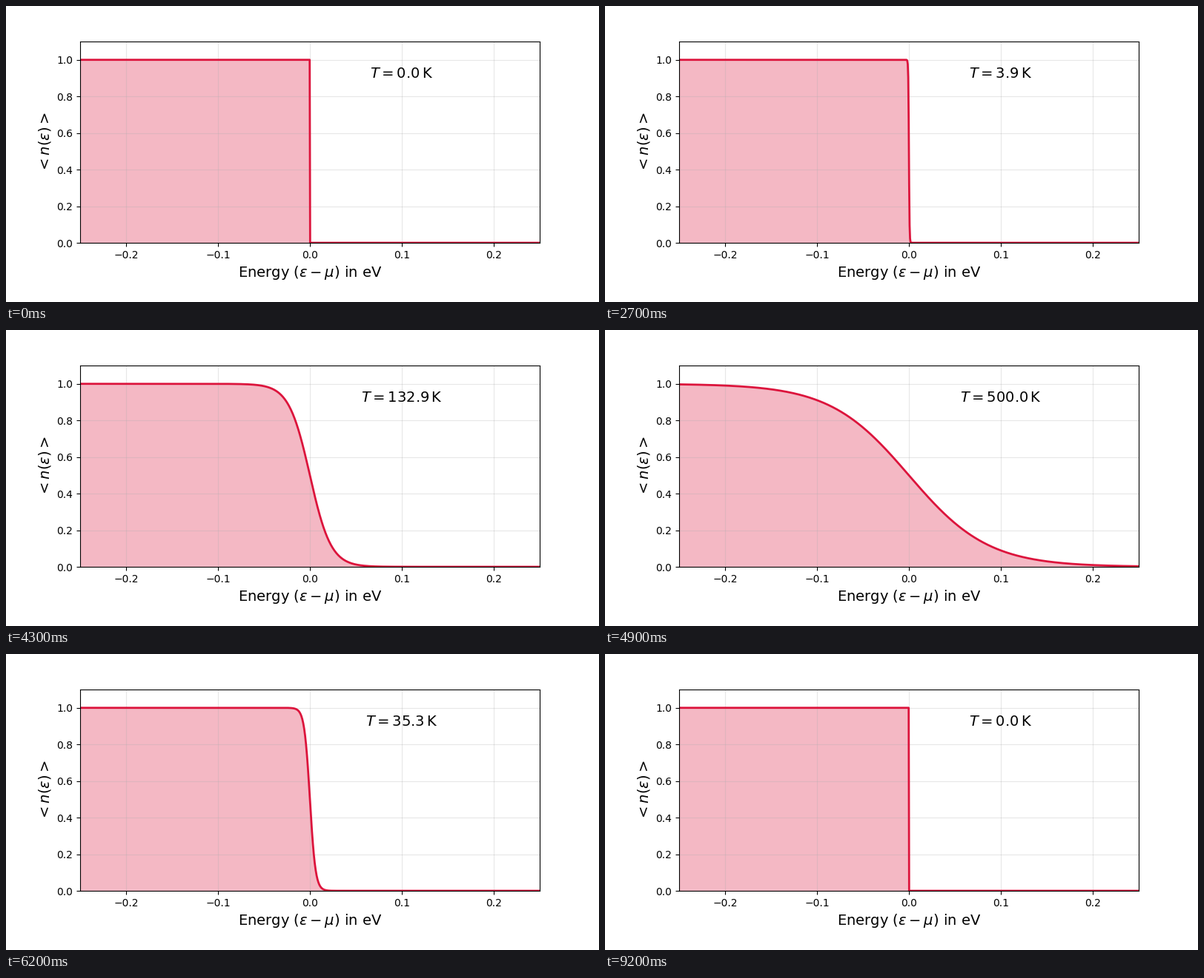
Write a matplotlib script that moves like this. It is 800 px wide and 400 px high and loops after 10 s.

```python
import numpy as np
import matplotlib.pyplot as plt
from matplotlib.animation import FuncAnimation

K_B = 8.617333e-5  # Boltzmann constant in eV/K
HALF = 50          # steps of heating, then as many of cooling
COLOR = "crimson"

energy = np.linspace(-0.25, 0.25, 1000)
heating = np.geomspace(0.01, 500, HALF)
temps = np.concatenate([heating, heating[::-1]])


def occupation(temp):
    """Fermi-Dirac distribution, in a form that cannot overflow."""
    return 0.5 * (1 - np.tanh(energy / (2 * K_B * temp)))


def area_under(curve):
    """Closed outline between the curve and the energy axis."""
    top = np.column_stack([energy, curve])
    return np.vstack([[energy[0], 0], top, [energy[-1], 0]])


fig, ax = plt.subplots(figsize=(8, 4), dpi=100)
fig.subplots_adjust(left=0.125, right=0.9, bottom=0.2, top=0.88)
ax.set_xlim(-0.25, 0.25)
ax.set_ylim(0, 1.1)
ax.set_xticks([-0.2, -0.1, 0, 0.1, 0.2])
ax.set_yticks([0, 0.2, 0.4, 0.6, 0.8, 1])
ax.set_xlabel(r"Energy $(\epsilon - \mu)$ in eV", fontsize=14)
ax.set_ylabel(r"$< n(\epsilon) >$", fontsize=14)
ax.grid(alpha=0.3)

start = occupation(temps[0])
fill = ax.fill_between(energy, start, facecolor=COLOR, alpha=0.3)
line, = ax.plot(energy, start, color=COLOR, linewidth=2)
label = ax.text(0.1, 0.9, "", fontsize=14, ha="center")


def update(i):
    curve = occupation(temps[i])
    line.set_ydata(curve)
    fill.set_verts([area_under(curve)])
    label.set_text(rf"$T = {temps[i]:.1f}\,\mathrm{{K}}$")
    return fill, line, label


anim = FuncAnimation(fig, update, frames=len(temps), interval=100,
                     repeat=True, repeat_delay=0)
plt.show()
```
